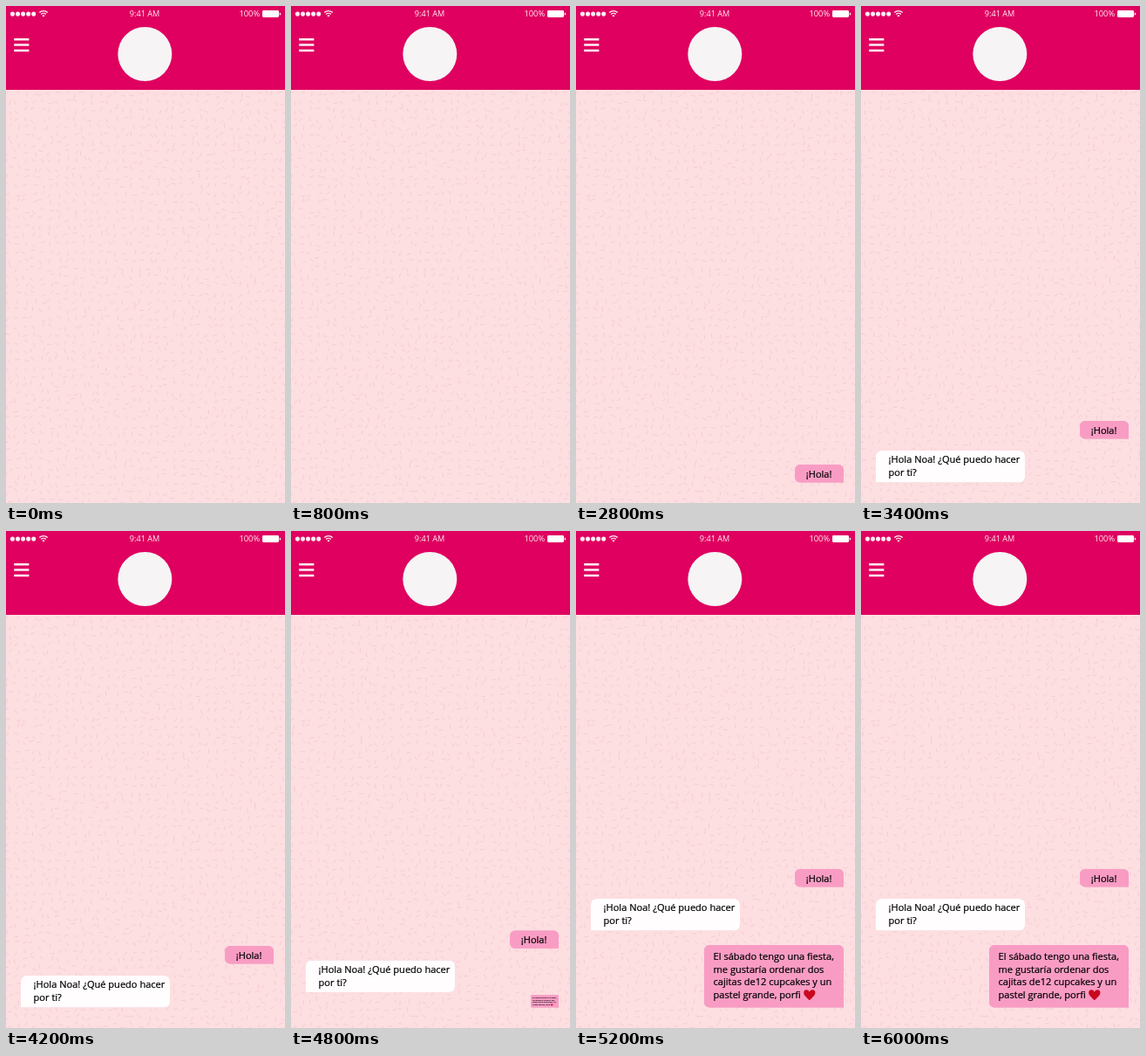
An HTML page for the animation above (8000 ms loop, 320x569 px).

```html
<!DOCTYPE html>
<html lang="es">
<head>
<meta charset="utf-8">
<title>Chat</title>
<style>
  html, body { margin: 0; width: 100%; height: 100%; overflow: hidden; background: #fddee1; }
  svg { display: block; width: 320px; height: 569px; }
  text { font: 11.06px "Open Sans", "Noto Sans", sans-serif; fill: #000; stroke: #000; stroke-width: .22px; }
  .status text { font-size: 9.1px; fill: #fff0f6; stroke: none; }
  .mine { fill: #f99cc4; }
  .theirs { fill: #fffdfe; }
  .bubble { filter: drop-shadow(0 .6px .7px rgba(170, 70, 110, .28)); }

  .hello, .reply, .order, .lift1, .lift2 { animation: 8s step-end infinite; }
  .hello, .order { transform-origin: 307px 545.5px; }
  .reply { transform-origin: 17px 545.5px; }
  .hello { animation-name: hello; }
  .reply { animation-name: reply; }
  .order { animation-name: order; }
  .lift1 { animation-name: lift1; }
  .lift2 { animation-name: lift2; }

  @keyframes hello {
    0% { transform: scale(0); }
    25% { transform: scale(.27); }
    27.5%, 100% { transform: scale(1); }
  }
  @keyframes reply {
    0% { transform: scale(0); }
    40% { transform: scale(.5); }
    42.5%, 100% { transform: scale(1); }
  }
  @keyframes lift1 {
    0% { transform: translateY(0); }
    40% { transform: translateY(-25px); }
    42.5%, 100% { transform: translateY(-50px); }
  }
  @keyframes order {
    0% { transform: scale(0); }
    60% { transform: scale(.2); }
    62.5% { transform: scale(.8); }
    65%, 100% { transform: scale(1); }
  }
  @keyframes lift2 {
    0% { transform: translateY(0); }
    60% { transform: translateY(-17.6px); }
    62.5% { transform: translateY(-70.4px); }
    65%, 100% { transform: translateY(-88px); }
  }
</style>
</head>
<body>
<svg viewBox="0 0 320 569">
  <rect width="320" height="569" fill="#fddee1"/>
  <path id="sprinkles" fill="none" stroke="#f1c4cb" stroke-width=".7" stroke-linecap="round"/>

  <g class="lift2">
    <g class="lift1">
      <g class="hello">
        <path class="bubble mine" d="M257 525H301a6 6 0 0 1 6 6V545.5H257a6 6 0 0 1 -6 -6V531a6 6 0 0 1 6 -6Z"/>
        <text x="263.8" y="539.6">¡Hola!</text>
      </g>
    </g>
    <g class="reply">
      <path class="bubble theirs" d="M23 509H182a6 6 0 0 1 6 6V539.5a6 6 0 0 1 -6 6H17V515a6 6 0 0 1 6 -6Z"/>
      <text x="31.6" y="523.4">¡Hola Noa! ¿Qué puedo hacer</text>
      <text x="31.6" y="538.2">por ti?</text>
    </g>
  </g>

  <g class="order">
    <path class="bubble mine" d="M153 474H301a6 6 0 0 1 6 6V545.5H153a6 6 0 0 1 -6 -6V480a6 6 0 0 1 6 -6Z"/>
    <text x="157.6" y="490.8">El sábado tengo una fiesta,</text>
    <text x="157.6" y="505.6">me gustaría ordenar dos</text>
    <text x="157.6" y="520.4">cajitas de12 cupcakes y un</text>
    <text x="157.6" y="535.2">pastel grande, porfi</text>
    <path fill="#c9071f" d="M267.8 537.3C265 534.5 261.2 532 261.2 528.6C261.2 524.6 266.4 524.2 267.8 527.8C269.2 524.2 274.4 524.6 274.4 528.6C274.4 532 270.6 534.5 267.8 537.3Z"/>
  </g>

  <rect width="320" height="96" fill="#df005f"/>
  <circle cx="159.3" cy="55" r="31" fill="#f6f4f5"/>
  <path d="M9.2 38.3H26.4M9.2 44.6H26.4M9.2 51H26.4" stroke="#fff0f6" stroke-width="2.5"/>

  <g class="status">
    <path d="M7.5 9.1H33" stroke="#fff0f6" stroke-width="5.1" stroke-linecap="round" stroke-dasharray="0 6.05"/>
    <path d="M38.3 7.6A6.6 6.6 0 0 1 47.7 7.6M40.2 9.5A4 4 0 0 1 45.8 9.5" fill="none" stroke="#fff0f6" stroke-width="1.4"/>
    <path d="M41.4 10.9A2.3 2.3 0 0 1 44.6 10.9L43 12.6Z" fill="#fff0f6"/>
    <text x="159" y="12.3" text-anchor="middle">9:41 AM</text>
    <text x="291.2" y="12.3" text-anchor="end" style="font-size:9.4px">100%</text>
    <rect x="294" y="5.1" width="19" height="7.8" rx="1.4" fill="#fff"/>
    <path d="M313.7 7.4a1.6 1.6 0 0 1 0 3.2Z" fill="#fff0f6"/>
  </g>
</svg>
<script>
  // Jittered grid of short dashes, seeded so it is always the same.
  let seed = 17;
  const random = () => (seed = (seed * 16807) % 2147483647) / 2147483647;
  const step = 9.5;
  let d = "";
  for (let y = 98; y < 575; y += step) {
    for (let x = 0; x < 326; x += step) {
      const cx = x + random() * 6, cy = y + random() * 6;
      const angle = random() * Math.PI;
      const dx = Math.cos(angle) * 2, dy = Math.sin(angle) * 2;
      d += `M${(cx - dx).toFixed(1)} ${(cy - dy).toFixed(1)}L${(cx + dx).toFixed(1)} ${(cy + dy).toFixed(1)}`;
    }
  }
  document.getElementById("sprinkles").setAttribute("d", d);
</script>
</body>
</html>
```
